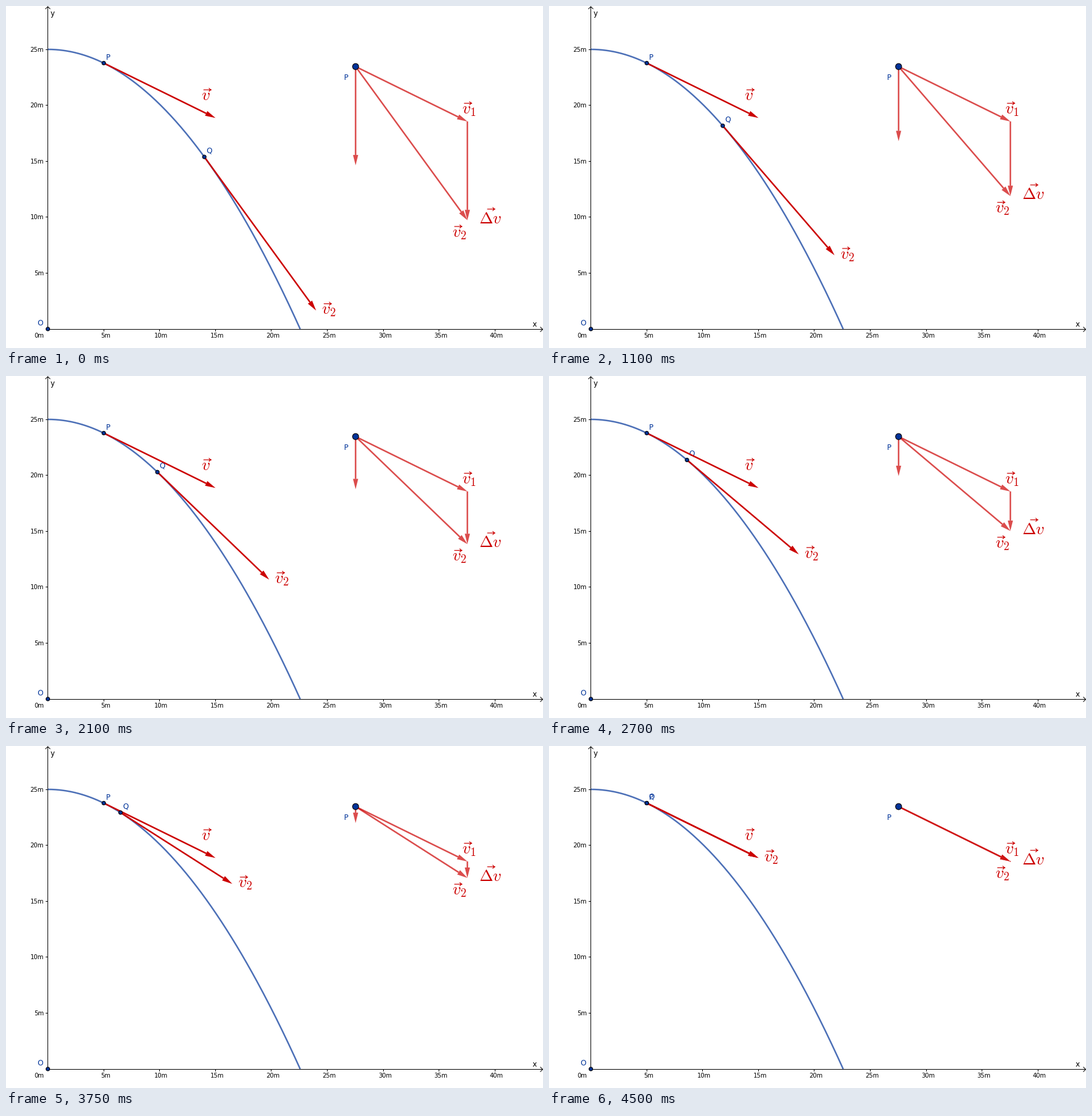
A matplotlib script for the animation above (4550 ms loop, 880x560 px).

```python
import numpy as np
import matplotlib.pyplot as plt
from matplotlib.animation import FuncAnimation
from matplotlib.patches import Circle, PathPatch, Polygon
from matplotlib.path import Path

W, H, DPI = 880, 560, 100
FRAMES, INTERVAL = 91, 50
PT = 72 / DPI                      # points per pixel
X0, Y0, SCALE = 68.6, 528.9, 18.315
G, SPEED, HEIGHT = 9.81, 10, 25
RED, BLUE = "#cc0000", "#003399"

plt.rcParams["font.family"] = "DejaVu Sans"
plt.rcParams["mathtext.fontset"] = "cm"
plt.rcParams["path.snap"] = False

fig = plt.figure(figsize=(W / DPI, H / DPI), dpi=DPI, facecolor="white")
ax = fig.add_axes([0, 0, 1, 1])
ax.set(xlim=(0, W), ylim=(H, 0))
ax.axis("off")


def to_px(x, y):
    return np.array([X0 + SCALE * x, Y0 - SCALE * y])


def fall(x):
    return HEIGHT - G * x ** 2 / (2 * SPEED ** 2)


def velocity(x):
    """Velocity at distance x, as a pixel offset."""
    return SCALE * np.array([SPEED, G * x / SPEED])


def line(xs, ys, color="black", width=1, **kw):
    kw.setdefault("solid_capstyle", "butt")
    return ax.plot(xs, ys, color=color, lw=width * PT, **kw)[0]


def text(x, y, s, size, color="black", ha="left", z=3):
    return ax.text(x, y, s, fontsize=size * PT, color=color, ha=ha,
                   va="baseline", zorder=z)


def dot(pos, radius):
    return ax.add_patch(Circle(pos, radius, fc=BLUE, ec="black",
                               lw=1.1 * PT, zorder=8))


class Vector:
    HEAD = 17

    def __init__(self, alpha=1):
        self.shaft = line([], [], RED, 2.5, alpha=alpha, zorder=5)
        self.head = ax.add_patch(Polygon(np.zeros((3, 2)), fc=RED, lw=0,
                                         alpha=alpha, zorder=5))

    def place(self, start, offset):
        length = np.hypot(*offset)
        unit = offset / length if length > 1e-6 else np.zeros(2)
        size = min(self.HEAD, length)
        tip = start + offset
        base = tip - unit * size
        side = np.array([-unit[1], unit[0]]) * size / 4
        self.shaft.set_data(*zip(start, base))
        self.head.set_xy([tip, base + side, base - side])


class VecLabel:
    """Letter with an arrow accent and an optional index."""
    ACCENT = np.array([(0, 0), (12, 0), (8.8, -2.7), (9.6, -0.8), (12.2, 0),
                       (9.6, 0.8), (8.8, 2.7)])
    CODES = [Path.MOVETO, Path.LINETO, Path.MOVETO] + [Path.CURVE3] * 4

    def __init__(self, letters, index="", shift=(4, -16.7)):
        self.shift = np.array(shift)
        self.body = text(0, 0, f"${letters}$", 27, RED, z=6)
        self.index = text(0, 0, f"${index}$" if index else "", 19, RED, z=6)
        self.accent = ax.add_patch(PathPatch(Path(self.ACCENT, self.CODES),
                                             fc="none", ec=RED, lw=1.2 * PT,
                                             capstyle="round", zorder=6))

    def place(self, x, y):
        self.body.set_position((x, y))
        self.index.set_position((x + 13, y + 4))
        self.accent.set_path(Path(self.ACCENT + self.shift + (x, y),
                                  self.CODES))


def draw_axes():
    line([68.5, 879], [529.5, 529.5])
    line([68.5, 68.5], [1, 530])
    line([875.5, 879.5, 875.5], [525.5, 529.5, 533.5])
    line([64.5, 68.5, 72.5], [5, 1, 5])
    for m in range(5, 45, 5):
        x = int(to_px(m, 0)[0])
        line([x + 0.5] * 2, [529.5, 533])
        text(x + 3, 543, f"{m}m", 10, ha="center")
    for m in range(5, 30, 5):
        y = int(to_px(0, m)[1])
        line([65, 68.5], [y + 0.5] * 2)
        text(62, y + 4, f"{m}m", 10, ha="right")
    text(62, 543, "0m", 10, ha="right")
    text(863, 525, "x", 12)
    text(72.5, 16, "y", 12)


draw_axes()
xs = np.linspace(0, HEIGHT ** 0.5 * SPEED * (2 / G) ** 0.5, 200)
line(*to_px(xs, fall(xs)), BLUE, 2.5, alpha=0.7, zorder=2)

P_X = 5
p = to_px(P_X, fall(P_X))
hub = np.array([572.9, 99.2])
v1 = velocity(P_X)

dot(to_px(0, 0), 3)
dot(p, 3)
dot(hub, 5)
text(51.5, 523, "O", 12, BLUE)
text(163.6, 88, "P", 12, BLUE)
text(553.5, 121, "P", 12, BLUE)

Vector().place(p, v1)
Vector(0.7).place(hub, v1)
VecLabel("v").place(320, 154)
VecLabel("v", "1").place(747, 176)

q_dot = dot(p, 3)
q_text = text(0, 0, "Q", 12, BLUE)
q_vec = Vector()
q_label = VecLabel("v", "2")
sum_vec, drop_vec, diff_vec = Vector(0.7), Vector(0.7), Vector(0.7)
sum_label = VecLabel("v", "2")
diff_label = VecLabel(r"\Delta v", shift=(14, -23.2))
speck = ax.add_patch(Circle(hub + v1, 0.9, fc=RED, lw=0, alpha=0.7, zorder=5))


def update(i):
    x = 14 - 0.1 * i
    q = to_px(x, fall(x))
    v2 = velocity(x)
    diff = v2 - v1

    q_dot.center = q
    q_text.set_position((q[0] + 3.6, q[1] - 6.5))
    q_vec.place(q, v2)
    tip = q + v2
    q_label.place(tip[0] + 9, tip[1] + 5.6)

    sum_vec.place(hub, v2)
    drop_vec.place(hub, diff)
    diff_vec.place(hub + v1, diff)
    speck.set_visible(np.hypot(*diff) < 1)
    end = hub + v2
    sum_label.place(731, end[1] + 27)
    diff_label.place(775, end[1] + 5)
    return []


anim = FuncAnimation(fig, update, frames=FRAMES, interval=INTERVAL,
                     init_func=lambda: update(0), repeat=True, repeat_delay=0)
plt.show()
```
